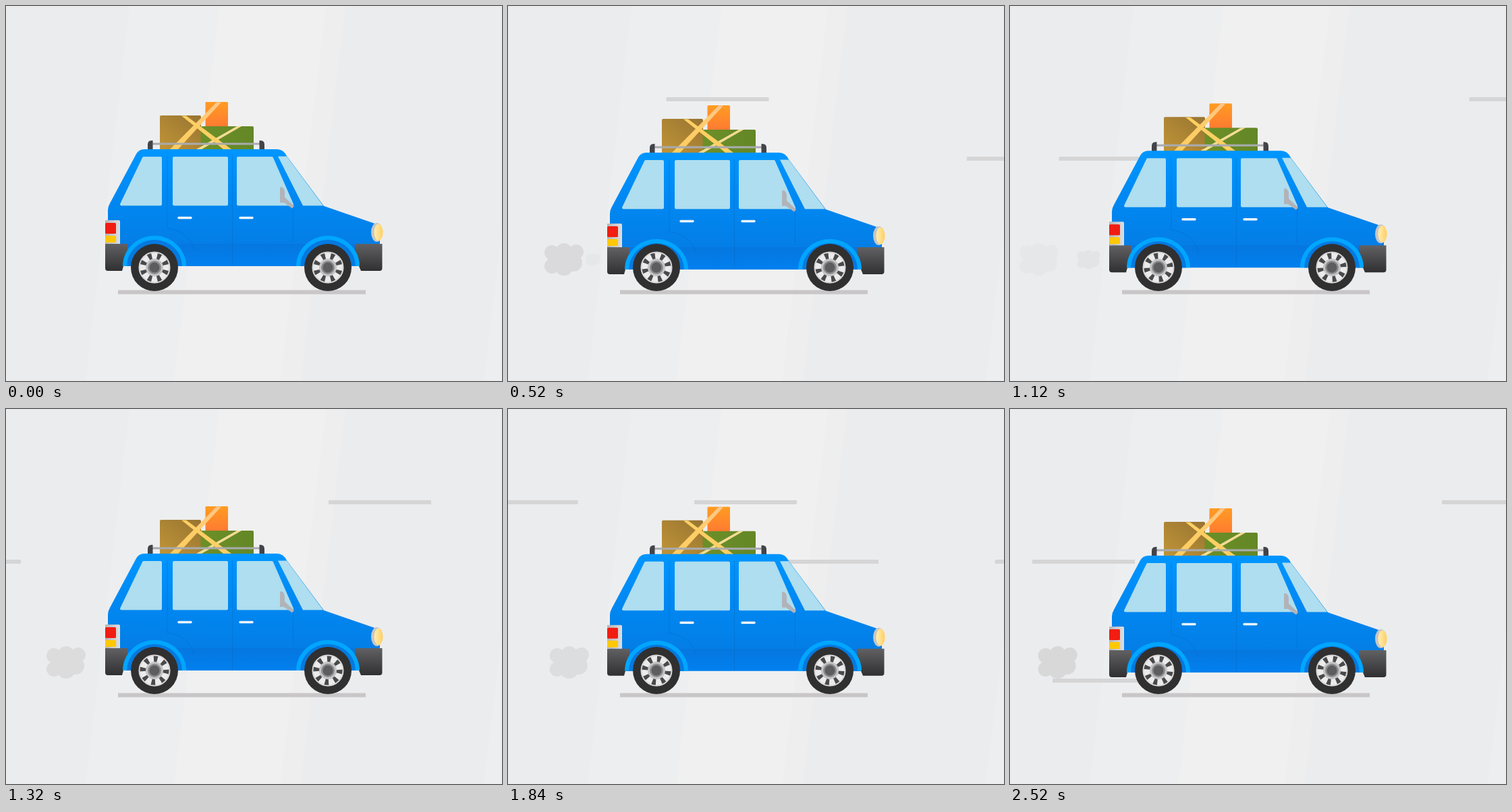
An HTML page for the animation above (2.56 s loop, 735x555 px).

```html
<!DOCTYPE html>
<html lang="en">
<head>
<meta charset="utf-8">
<title>Road trip</title>
<style>
html, body { margin: 0; width: 100%; height: 100%; overflow: hidden; background: #ebecee; }
svg { display: block; width: 735px; height: 555px; }
</style>
</head>
<body>
<svg viewBox="0 0 735 555">
  <defs>
    <linearGradient id="paint" x2="0" y2="1">
      <stop stop-color="#0096ff"/><stop offset=".55" stop-color="#0087f1"/><stop offset="1" stop-color="#047ee6"/>
    </linearGradient>
    <linearGradient id="sill" x2="0" y2="1"><stop stop-color="#0677df"/><stop offset="1" stop-color="#0080ef"/></linearGradient>
    <linearGradient id="bumper" x2="0" y2="1"><stop stop-color="#616163"/><stop offset="1" stop-color="#303032"/></linearGradient>
    <linearGradient id="brown" y1="1" x2="1" y2="0"><stop stop-color="#c09538"/><stop offset="1" stop-color="#987431"/></linearGradient>
    <linearGradient id="orange" x2="0" y2="1"><stop stop-color="#ff9c22"/><stop offset="1" stop-color="#ff7a32"/></linearGradient>
    <linearGradient id="green"><stop stop-color="#6c8f28"/><stop offset="1" stop-color="#648727"/></linearGradient>
    <linearGradient id="strap" y1="1" x2="0" y2="0"><stop stop-color="#ffcd60"/><stop offset=".5" stop-color="#ffcd69"/><stop offset="1" stop-color="#ffc68a"/></linearGradient>
    <linearGradient id="silver"><stop stop-color="#b5b5b7"/><stop offset="1" stop-color="#dedee0"/></linearGradient>
    <linearGradient id="lamp"><stop stop-color="#ffeeb0"/><stop offset="1" stop-color="#ffcf62"/></linearGradient>
    <g id="puff">
      <circle cx="-18" cy="-11" r="11"/><circle cx="0" cy="-13" r="12"/><circle cx="18" cy="-12" r="11"/>
      <circle cx="-18" cy="9" r="11"/><circle cx="0" cy="9" r="14"/><circle cx="14" cy="4" r="13"/><circle cx="-8" r="14"/>
    </g>
    <g id="wheel">
      <circle r="35" fill="#303031"/>
      <circle r="23.5" fill="#4a4a4c"/>
      <g class="rim">
        <circle r="17.5" fill="none" stroke="#ebebec" stroke-width="11" pathLength="80" stroke-dasharray="6 4" stroke-dashoffset="3"/>
      </g>
      <circle r="22.5" fill="none" stroke="#d6d6d7" stroke-width="2"/>
      <circle r="13" fill="#c4c4c5"/>
      <circle r="10" fill="#8a8a8c"/>
      <circle r="7.5" fill="#5d5d5f"/>
    </g>
    <g id="arch">
      <path d="M-47 0a47 45 0 0 1 94 0z" fill="#00a6ff"/>
      <path d="M-41 0a41 39 0 0 1 82 0z" fill="#0679df"/>
    </g>
  </defs>

  <path d="M183 0H316L249 555H118z" fill="#edeeef"/>
  <path d="M316 0H475L407 555H249z" fill="#f0f0f0"/>
  <path d="M475 0H503L437 555H407z" fill="#eeeeef"/>
  <path d="M735 328V555H708z" fill="#edeef0"/>

  <rect x="166" y="420.5" width="367" height="6" fill="#c8c6c6"/>
  <g id="streaks" fill="#d5d5d6"></g>
  <g id="smoke" fill="#d8d8d9"></g>

  <g id="body">
    <rect x="228" y="162" width="61" height="52" rx="2" fill="url(#brown)"/>
    <rect x="295.5" y="142" width="33.5" height="37" rx="1.5" fill="url(#orange)"/>
    <rect x="288.5" y="178" width="78.5" height="36" rx="2" fill="url(#green)"/>
    <path d="M243 212H255L319 142.500H312z" fill="url(#strap)"/>
    <path d="M282 212H290L349 178H342z" fill="#f3dc95"/>
    <path d="M260 162.500H267L334 212H322z" fill="#ffcf63"/>
    <path d="M213 204H380" stroke="#a9abb0" stroke-width="3"/>
    <path d="M210 213V205Q210 199 216 199H217.500V213zM383 213V205Q383 199 377 199H375.500V213z" fill="#434449"/>

    <path d="M205 212H402Q411 212 416 222L471 296L545 321.500Q552 324 554 334V353H151V302Q151 297 154 292L193 219Q197 212 205 212z" fill="url(#paint)"/>
    <path d="M160 352H545V385H160z" fill="url(#sill)"/>
    <path d="M147 352H180V385H174L172 392H151Q147 392 147 388z" fill="url(#bumper)"/>
    <path d="M517 352H557.500V388Q557.500 392 553.500 392H526L523 385H517z" fill="url(#bumper)"/>
    <use href="#arch" x="220" y="385"/>
    <use href="#arch" x="477" y="385"/>

    <g fill="#aedeef" stroke="#aedeef" stroke-width="4" stroke-linejoin="round">
      <path d="M204 225H229V293.500H171z"/>
      <path d="M249 225H327V293.500H249z"/>
      <path d="M344 225H394L424 293.500H344z"/>
    </g>
    <path d="M403 222.500H416L470 295.500H440z" fill="#aedeef"/>

    <path d="M239 222V329Q272 334 279 362M335.500 222V384M425.500 297V349" fill="none" stroke="#0862b6" stroke-opacity=".35"/>
    <path d="M256 313.500H274M347 313.500H365" stroke="#eef5fc" stroke-width="3.500" stroke-linecap="round"/>
    <path d="M406 270Q406 267 409 268Q413 270 413 276V283L427 296L424 299.500L412 291H406z" fill="#b2b3b8"/>

    <path d="M147 317H167Q169 317 169 319V352H147z" fill="url(#silver)"/>
    <rect x="147" y="321" width="16" height="16" rx="1.500" fill="#f11d12"/>
    <rect x="147" y="340" width="16" height="10" rx="1.500" fill="#ffc803"/>
    <ellipse cx="549.500" cy="335" rx="8.500" ry="14" fill="#c5c6c9"/>
    <ellipse cx="552" cy="335" rx="6.500" ry="12.500" fill="url(#lamp)"/>
  </g>
  <use href="#wheel" x="220" y="387"/>
  <use href="#wheel" x="477" y="387"/>
</svg>
<script>
const LOOP = 2560, STEP = 40, SPEED = 1.0125, TYRE = 35;
const $ = selector => document.querySelector(selector);

function add(parent, tag, attrs) {
  const el = document.createElementNS('http://www.w3.org/2000/svg', tag);
  for (const name in attrs) el.setAttribute(name, attrs[name]);
  return parent.appendChild(el);
}

// [y, x at the start of the loop]
const streaks = [
  [138, 761], [138, 1814.5], [138, 2139], [138, 3191.5],
  [226, 1206.5], [226, 2260], [226, 2584.5], [402, 2614.5]
].map(([y, x]) => ({ x, el: add($('#streaks'), 'rect', { y: y - 3, width: 152, height: 6 }) }));

const puffs = [92, 403, 936, 1469, 2003]
  .map(birth => ({ birth, el: add($('#smoke'), 'use', { href: '#puff' }) }));

// [time, body offset]
const bob = [[0, 0], [520, 5], [880, 2.7], [1320, 2], [1840, 2.7], [2200, 1.9], [2520, 5], [2560, 5]];

function bobAt(t) {
  const i = bob.findIndex(key => key[0] > t);
  const [t0, y0] = bob[i - 1], [t1, y1] = bob[i];
  return y0 + (y1 - y0) * (1 - Math.cos(Math.PI * (t - t0) / (t1 - t0))) / 2;
}

function draw(now) {
  const t = Math.floor(now % LOOP / STEP) * STEP;
  for (const { x, el } of streaks) el.setAttribute('x', x - SPEED * t);
  for (const { birth, el } of puffs) {
    const age = t - birth;
    const size = Math.max(0, Math.min(1, age / 310));
    const alpha = Math.max(0, Math.min(1, age / 500, (760 - age) / 200));
    el.setAttribute('transform', `translate(${142 - 0.138 * age} 376) scale(${size})`);
    el.setAttribute('opacity', alpha);
  }
  $('#body').setAttribute('transform', `translate(0 ${bobAt(t)})`);
  $('.rim').setAttribute('transform', `rotate(${SPEED * t / TYRE * 180 / Math.PI})`);
}

const start = performance.now();
function tick() {
  draw(performance.now() - start);
  requestAnimationFrame(tick);
}
tick();
</script>
</body>
</html>
```
